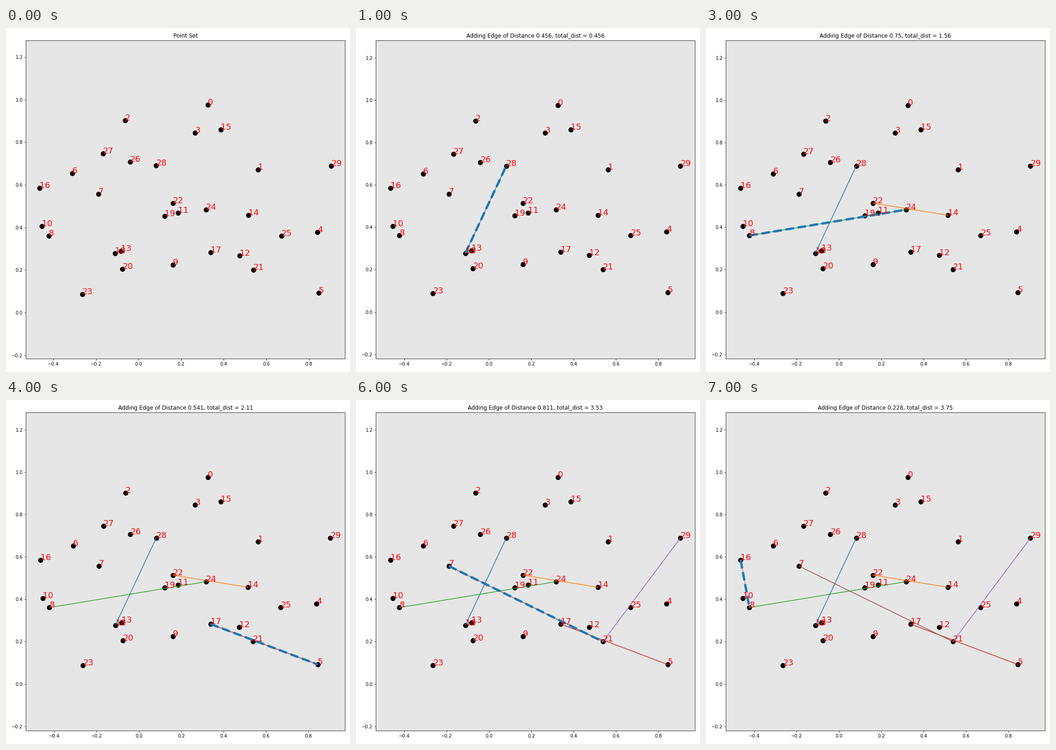
A matplotlib script that plays this animation: 748 px wide and 748 px high, repeating every 8 s.

```python
import matplotlib.pyplot as plt
from matplotlib.animation import FuncAnimation

SIZE, DPI = 748, 72
LEFT, RIGHT, BOTTOM, TOP = 43.4, 737.1, 28.9, 721.1  # axes box in pixels
CENTER = (0.2204, 0.531)

POINTS = [
    (0.326, 0.976), (0.562, 0.672), (-0.063, 0.902), (0.266, 0.845),
    (0.839, 0.378), (0.845, 0.092), (-0.311, 0.653), (-0.189, 0.557),
    (-0.422, 0.361), (0.161, 0.224), (-0.454, 0.406), (0.186, 0.469),
    (0.474, 0.268), (-0.082, 0.290), (0.515, 0.457), (0.387, 0.860),
    (-0.4635, 0.585), (0.339, 0.283), (-0.1105, 0.278), (0.123, 0.454),
    (-0.075, 0.205), (0.539, 0.200), (0.161, 0.514), (-0.264, 0.087),
    (0.317, 0.483), (0.670, 0.361), (-0.040, 0.707), (-0.167, 0.746),
    (0.0825, 0.690), (0.9045, 0.689),
]

# start point, end point, length
EDGES = [
    (18, 28, 0.456), (22, 14, 0.3588), (8, 24, 0.75), (17, 5, 0.541),
    (21, 29, 0.609), (7, 21, 0.811), (16, 8, 0.228),
]

fig = plt.figure(figsize=(SIZE / DPI, SIZE / DPI), dpi=DPI, facecolor="white")
ax = fig.add_axes([LEFT / SIZE, BOTTOM / SIZE,
                   (RIGHT - LEFT) / SIZE, (TOP - BOTTOM) / SIZE])
ax.set_facecolor("0.9")

ax.plot(*zip(*POINTS), "o", color="black", markersize=10, zorder=1)
for i, point in enumerate(POINTS):
    ax.annotate(str(i), point, color="red", fontsize=18)


def segment(a, b):
    return zip(POINTS[a], POINTS[b])


edge_lines = [ax.plot(*segment(a, b), color=f"C{i}", lw=1.5)[0]
              for i, (a, b, _) in enumerate(EDGES)]
highlight, = ax.plot([], [], "--", color="C0", lw=5)
title = ax.set_title("Point Set")


def set_view(scale):
    """Center the view with the given number of pixels per unit."""
    half_w = (RIGHT - LEFT) / 2 / scale
    half_h = (TOP - BOTTOM) / 2 / scale
    ax.set_xlim(CENTER[0] - half_w, CENTER[0] + half_w)
    ax.set_ylim(CENTER[1] - half_h, CENTER[1] + half_h)


def update(step):
    for i, line in enumerate(edge_lines):
        line.set_visible(i < step)
    highlight.set_visible(step > 0)
    if step == 0:
        set_view(463.2)
        title.set_text("Point Set")
    else:
        set_view(460.5)
        a, b, dist = EDGES[step - 1]
        highlight.set_data(*segment(a, b))
        total = sum(edge[2] for edge in EDGES[:step])
        title.set_text(f"Adding Edge of Distance {dist:.3g}, "
                       f"total_dist = {total:.3g}")
    return [*edge_lines, highlight, title]


anim = FuncAnimation(fig, update, frames=len(EDGES) + 1, interval=1000,
                     repeat=True, repeat_delay=0, blit=False)
plt.show()
```
